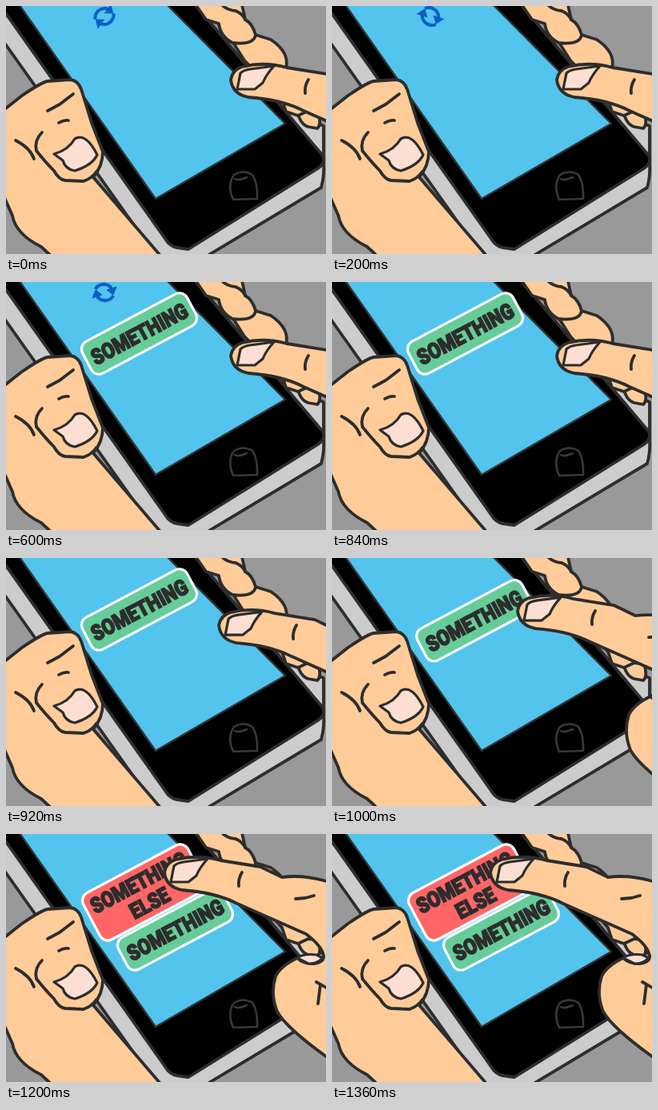
Write an HTML page that moves like this. It is 400 by 310 pixels and loops after 2.48 s.

```html
<!DOCTYPE html>
<html lang="en">
<head>
<meta charset="utf-8">
<title>Button shift</title>
<style>
  html, body { margin: 0; width: 100%; height: 100%; overflow: hidden; background: #999; }
  svg { display: block; width: 100vw; height: 100vh; }
  .ink { stroke: #2d2d2d; stroke-width: 3.8; stroke-linejoin: round; stroke-linecap: round; }
  .skin { fill: #ffcc99; }
  .nail { fill: #fcdfd2; stroke-width: 3.2; }
  .line { fill: none; }
  rect.edge { stroke: #fff; stroke-width: 3.2; }
  text { font: 900 23px Roboto, Inter, sans-serif; fill: #2d2d2d; stroke: #2d2d2d; stroke-width: 1.4; text-anchor: middle; }
</style>
</head>
<body>
<svg viewBox="0 0 400 310" preserveAspectRatio="none">
  <rect width="400" height="310" fill="#999"/>

  <g id="phone">
    <path class="ink" fill="#ccc" d="M-14 29 L187 312 H252 L394 227 Q398 212 397 199 V150 L0 -20Z"/>
    <path class="ink" d="M-14 -10 L199 291 Q205 301 214 302 L228 304 L390 203 Q400 196 396 187 L231 -8Z"/>
    <path fill="#52c4ee" stroke="#333" stroke-width="2.4" stroke-linejoin="round" d="M12 -8 L187 241 L349 147 L195 -8Z"/>
    <path fill="none" stroke="#383838" stroke-width="2.6" stroke-linecap="round" stroke-linejoin="round"
      d="M285 211 Q297 204 308 211 Q315 222 314 241 L284 242 Q276 224 285 211 M286 216 Q290 219 301 214"/>
  </g>

  <g id="spinner" fill="none" stroke="#0b5fc6" stroke-width="4">
    <g id="arrow">
      <path d="M-11.5 -4 Q-7 -11 1 -10 Q7 -9 9.5 -4"/>
      <path d="M15 -7 L11 3 L3 -3Z" fill="#0b5fc6" stroke-width="1"/>
    </g>
    <use href="#arrow" transform="rotate(180)"/>
  </g>

  <g id="red"></g>
  <g id="green"></g>

  <g id="fingers" class="ink skin">
    <path d="M364 130 Q367 148 378 151 L389 153 Q395 148 390 132Z"/>
    <path d="M330 100 L345 117 L350 132 L365 137 L380 130 L384 118Z"/>
    <path d="M284 46 L298 68 Q318 90 336 92 L350 78 Q355 58 331 42 L312 36Z"/>
    <path d="M234 -6 L250 17 L266 22 Q268 38 283 46 Q310 49 312 36 Q308 22 299 17 L294 -6Z"/>
    <path class="line" d="M268 -4 Q274 5 287 6 Q296 10 299 17"/>
  </g>

  <g id="left" class="ink skin">
    <path d="M-8 134 L20 112 Q45 95 52 94 L80 92 Q90 93 94 104 L107 146 L121 182 Q121 200 109 214 L193 312 H56 L44 301 Q12 285 8 262 L-8 226Z"/>
    <path class="line" d="M45 158 Q35 168 38 181 Q50 196 60 206 Q66 217 74 218 L97 219 Q108 215 113 207"/>
    <path class="line" d="M12 168 Q30 177 35 191 M52 131 L67 123 L84 110 M66 146 Q72 142 78 143"/>
    <path class="nail" d="M60 185 Q78 180 86 166 Q100 158 114 186 Q108 199 86 206 Q74 204 71 193Z"/>
  </g>

  <g id="right" class="ink skin">
    <path d="M198 48 Q200 36 212 32 Q240 25 268 33 L318 41 L345 54 Q375 50 410 62 L490 90 V310 H430 L400 278 Q350 242 339 222 Q330 200 337 178 Q343 165 364 155 Q372 163 386 162 Q398 160 397 152 Q395 140 375 125 L289 87 Q262 73 220 70 Q200 66 198 48Z"/>
    <path class="nail" d="M206 60 L210 40 Q214 36 222 35 L252 31 Q242 42 238 52 L228 60Z"/>
    <path class="line" d="M295 48 Q290 56 291 65 M362 81 L374 80 L385 77 M388 185 L402 193 M393 188 L390 212"/>
    <path class="nail" d="M364 155 Q372 149 388 151 L396 155 Q388 163 378 162Z"/>
  </g>
</svg>

<script>
const LOOP = 2480, STEP = 40, LINE = 29;
const $ = id => document.getElementById(id);

// Rounded button with its lines of text centred on it
function button(id, colour, height, lines) {
  const rows = lines.map((s, i) => {
    const y = 10 + (i - (lines.length - 1) / 2) * LINE;
    return `<text transform="translate(0 ${y}) scale(1 1.18)">${s}</text>`;
  });
  $(id).innerHTML = `<rect class="edge" x="-74" y="${-height / 2}" width="148"
    height="${height}" rx="11" fill="${colour}"/>` + rows.join('');
}
button('green', '#66cc99', 45, ['SOMETHING']);
button('red', '#ff6666', 66, ['SOMETHING', 'ELSE']);

const progress = (t, from, to) => Math.max(0, Math.min(1, (t - from) / (to - from)));
const show = (id, on) => $(id).setAttribute('visibility', on ? 'visible' : 'hidden');
const place = (id, x, y, turn = 0) =>
  $(id).setAttribute('transform', `translate(${x} ${y}) rotate(${turn})`);

function render(now) {
  const t = Math.floor(now % LOOP / STEP) * STEP;
  const slide = progress(t, 920, 1080) ** 2;
  const away = 1 - progress(t, 885, 1080);
  show('spinner', t < 720);
  show('green', t >= 600);
  show('red', t >= 1080);
  place('spinner', 123, 13, (t - 600) * .36);
  place('red', 172.5, 73, -28);
  place('green', 166.5 + 45 * slide, 64.5 + 55 * slide, -28);
  place('right', 83 * away, 44 * away);
}

const start = performance.now();
function tick() {
  render(performance.now() - start);
  requestAnimationFrame(tick);
}
tick();
</script>
</body>
</html>
```
